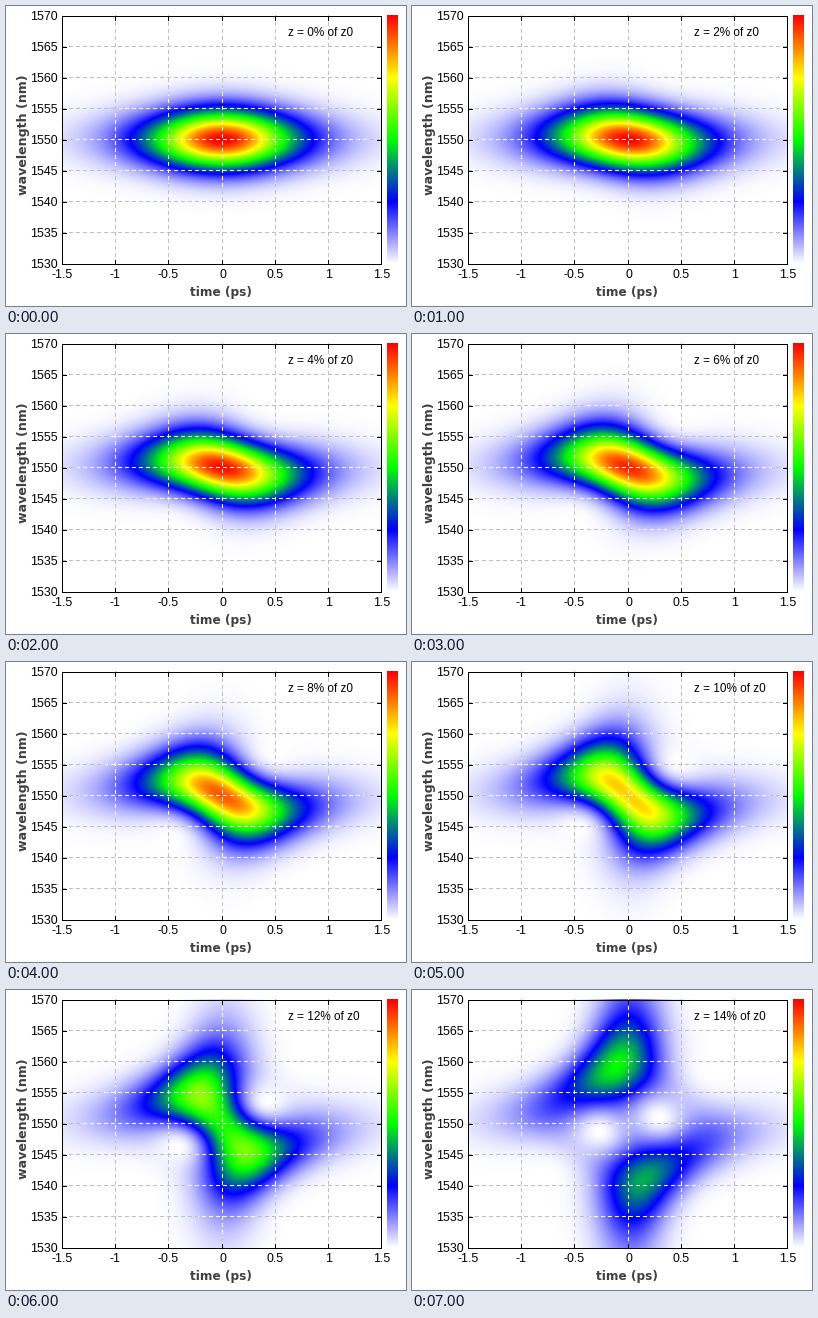
Animation of 400 by 300 pixels, one loop 8 s. Source, as a matplotlib script:

```python
import numpy as np
import matplotlib.pyplot as plt
from matplotlib.animation import FuncAnimation
from matplotlib.colors import LinearSegmentedColormap

W, H = 400, 300
LEFT, RIGHT, TOP, BOTTOM = 56, 375, 9, 257  # pixel columns and rows of the frame
COLS, ROWS = RIGHT - LEFT + 1, BOTTOM - TOP + 1
STEPS, STEP_PERCENT = 8, 2

# Pulse and gate, times in ps
T0 = 1.0 / 1.763
GATE_FWHM = 0.5
ORDER = 4.0
RAMAN = 0.007
CENTRE_NM = 1550.0
LIGHT = 299792.458  # nm per ps

cmap = LinearSegmentedColormap.from_list(
    "spectrum", ["white", "blue", "lime", "yellow", "red"], N=1024)


def propagate():
    """Split-step solution of the soliton equation, one field per step."""
    n, span = 1024, 24.0
    tau = (np.arange(n) - n // 2) * span / n
    w = 2 * np.pi * np.fft.fftfreq(n, span / n)
    sub = 120
    dz = STEP_PERCENT / 100 * np.pi / 2 / sub
    half = np.exp(-0.25j * w**2 * dz)
    u = 1 / np.cosh(tau) + 0j
    fields = [u]
    for _ in range(STEPS - 1):
        for _ in range(sub):
            u = np.fft.ifft(half * np.fft.fft(u))
            p = np.abs(u)**2
            slope = np.gradient(p, tau)
            u = u * np.exp(1j * ORDER**2 * (p - RAMAN * slope) * dz)
            u = np.fft.ifft(half * np.fft.fft(u))
        fields.append(u)
    return tau * T0, fields


def spectrograms():
    """Gated spectra over the plot area, one value per pixel, top row first."""
    t, fields = propagate()
    delay = np.linspace(-1.5, 1.5, COLS)
    nm = np.linspace(1570, 1530, ROWS)
    omega = 2 * np.pi * LIGHT * (1 / nm - 1 / CENTRE_NM)
    kernel = np.exp(1j * np.outer(omega, t))
    gate = np.exp(-2 * np.log(2) * ((t[:, None] - delay) / GATE_FWHM)**2)
    maps = [np.abs(kernel @ (u[:, None] * gate))**2 for u in fields]
    return np.array(maps) / maps[0].max()


def ticks(first, last, count):
    return np.rint(np.linspace(first, last, count)).astype(int)


def grid_mask():
    mask = np.zeros((ROWS, COLS), bool)
    for x in xticks[1:-1]:
        mask[::-1, x - LEFT] |= np.arange(ROWS) % 7 < 4
    for y in yticks[1:-1]:
        mask[y - TOP] |= np.arange(COLS) % 7 < 4
    return mask


xticks = ticks(LEFT, RIGHT, 7)
yticks = ticks(BOTTOM, TOP, 9)
maps = spectrograms()
grid = grid_mask()


def picture(i):
    """Heat map with a grid that is grey on the pale ground, white on colour."""
    rgb = cmap(maps[i])[..., :3]
    rgb[grid] = np.where(maps[i][grid] > 0.05, 1.0, 0.75)[:, None]
    return rgb


fig = plt.figure(figsize=(W / 100, H / 100), dpi=100, facecolor="white")
ax = fig.add_axes([0, 0, 1, 1])


def line(xs, ys):
    # Lines snap to whole pixels; rows count from the bottom, hence the 1
    ax.plot(xs, np.add(ys, 1), color="black", lw=0.72, antialiased=False)


def label(x, y, text, px=12.4, **kw):
    kw = {"family": "Liberation Sans", "color": "black", **kw}
    return ax.text(x, y, text, fontsize=px * 0.72, **kw)


image = ax.imshow(picture(0), aspect="auto", interpolation="nearest",
                  extent=(LEFT, RIGHT + 1, BOTTOM + 1, TOP))
ax.imshow(np.linspace(1, 0, ROWS)[:, None], cmap=cmap, aspect="auto",
          interpolation="nearest", extent=(381, 392, BOTTOM + 1, TOP))
ax.set_xlim(0, W)
ax.set_ylim(H, 0)
ax.axis("off")

for i, x in enumerate(xticks):
    line([x, x], [BOTTOM, BOTTOM - 4])
    line([x, x], [TOP, TOP + 4])
    label(x + 0.5, 272, f"{-1.5 + i / 2:g}", ha="center")

for i, y in enumerate(yticks):
    line([LEFT, LEFT + 4], [y, y])
    line([RIGHT, RIGHT - 4], [y, y])
    label(51.5, y + 5, str(1530 + 5 * i), ha="right")

line([LEFT, RIGHT, RIGHT, LEFT, LEFT], [TOP, TOP, BOTTOM, BOTTOM, TOP])

title = dict(family="DejaVu Sans", weight="bold", color="#404040")
label(215, 290, "time (ps)", px=12.1, ha="center", **title)
label(21, 128.5, "wavelength (nm)", px=12.6, rotation=90, ha="center",
      va="baseline", rotation_mode="anchor", **title)
caption = label(282.5, 30, "", px=11.7)


def update(i):
    image.set_data(picture(i))
    caption.set_text(f"z = {STEP_PERCENT * i}% of z0")
    return image, caption


anim = FuncAnimation(fig, update, frames=STEPS, interval=1000,
                     repeat=True, repeat_delay=0)
plt.show()
```
